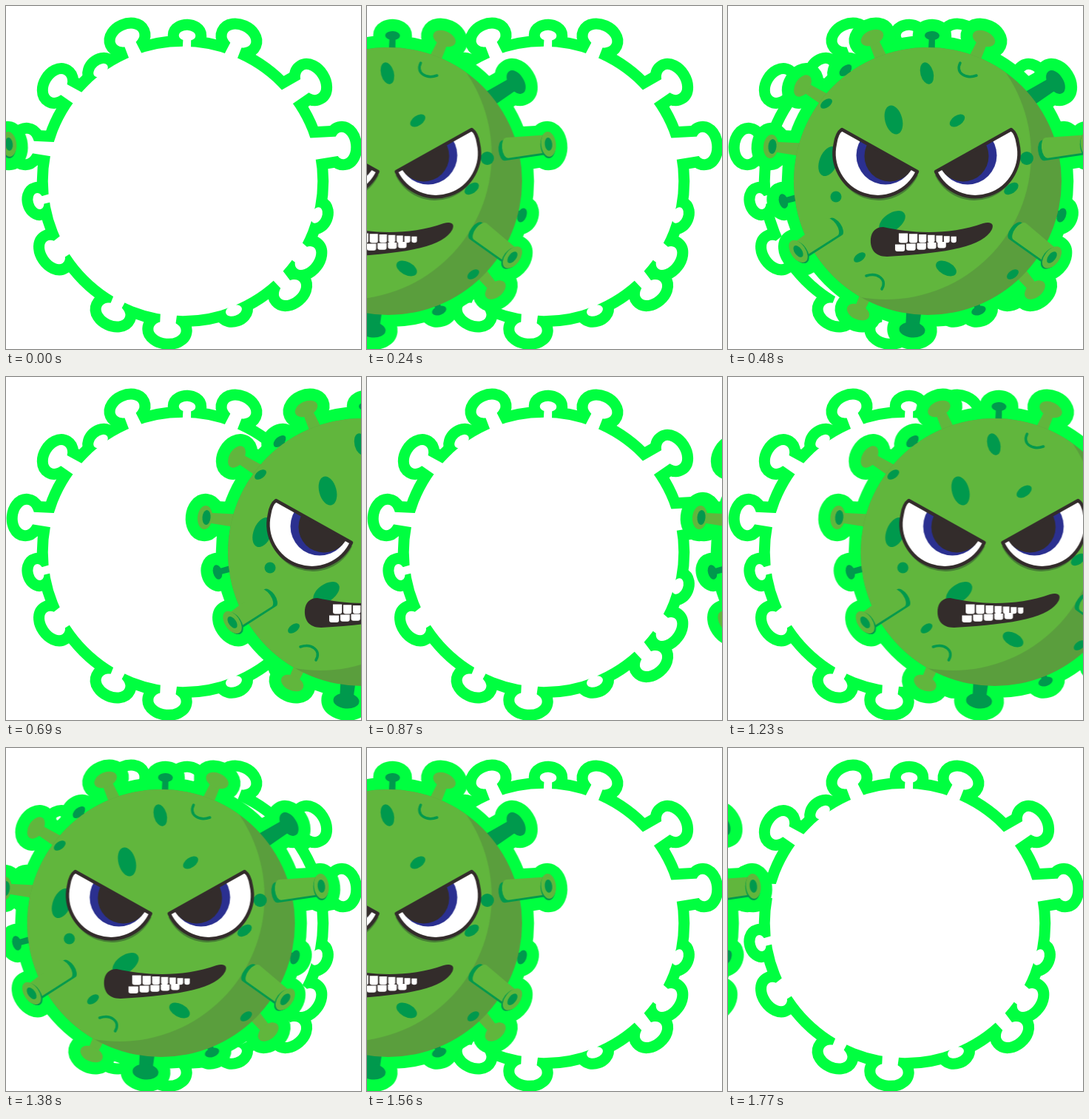
Recreate the animation shown at these times as an HTML page. Size 480 by 464 pixels, loop 1800 ms.

```html
<!DOCTYPE html>
<html lang="en">
<head>
<meta charset="utf-8">
<title>Angry virus</title>
<style>
  html, body { margin: 0; width: 100%; height: 100%; overflow: hidden; background: #fff; }
  svg { display: block; width: 100%; height: 100%; }
  .ring { fill: #00ff40; stroke: #00ff40; stroke-width: 32.5; stroke-linejoin: round; }
  .hole { fill: #fff; stroke: #fff; stroke-width: 2.5; }
  .light { fill: #61b63d; }
  .shade { fill: #5a9e3d; }
  .dark { fill: #00994d; }
  .ink { fill: #332c2b; }
  .curl { fill: none; stroke: #00994d; stroke-width: 3.5; stroke-linecap: round; }
  #virus { animation: sweep 1800ms -3ms infinite; }
  @keyframes sweep {
    0%, 100% { transform: translateX(-482.7px); animation-timing-function: steps(30, end); }
    50% { transform: translateX(422.2px); animation-timing-function: steps(30, end); }
  }
</style>
</head>
<body>
<svg viewBox="0 0 480 464">
  <defs>
    <circle id="ball" cx="270" cy="237" r="181"/>
    <clipPath id="ballClip"><use href="#ball"/></clipPath>
    <g id="shape"><use href="#ball"/></g>
    <path id="lid" d="M154 167 L256 224 A59 59 0 0 1 145 186 Q147 172 154 167Z"/>
    <clipPath id="lidClip"><use href="#lid"/></clipPath>
    <g id="eye">
      <use href="#lid" transform="translate(1 5)" fill="#477f35"/>
      <use href="#lid" fill="#fff"/>
      <g clip-path="url(#lidClip)">
        <circle cx="213" cy="202" r="39.5" fill="#2b3090"/>
        <circle cx="219" cy="203" r="34.5" class="ink"/>
      </g>
      <use href="#lid" fill="none" stroke="#332c2b" stroke-width="4.5" stroke-linejoin="round"/>
    </g>
  </defs>

  <g transform="translate(-31 0)">
    <use href="#shape" class="ring"/>
    <use href="#shape" class="hole"/>
  </g>

  <g id="virus">
    <use href="#shape" class="ring"/>
    <g id="back"></g>
    <use href="#ball" class="shade"/>
    <circle cx="214" cy="201" r="196" class="light" clip-path="url(#ballClip)"/>
    <g id="spots" class="dark">
      <circle cx="146" cy="258" r="7.5"/>
      <circle cx="404" cy="206" r="9"/>
    </g>
    <path class="curl" d="M314 77 C307 91 322 99 336 94 M187 365 C202 360 216 370 208 383"/>
    <g id="front"></g>

    <use href="#eye"/>
    <use href="#eye" transform="matrix(-1 0 0 1 537 0)"/>
    <path class="ink" d="M210 299 C250 308 300 310 345 294 C356 291 360 295 357 302 C345 325 300 334 215 339 C198 339 192 328 193 315 C194 305 200 299 210 299Z"/>
    <g id="teeth" fill="#fff"></g>
  </g>
</svg>
<script>
  const add = (id, markup) => document.getElementById(id).insertAdjacentHTML('beforeend', markup);
  const oval = (rx, ry, cls = '') => `<ellipse class="${cls}" rx="${rx}" ry="${ry}"/>`;
  const place = (x, y, turn, inner, cls = '') =>
    `<g class="${cls}" transform="translate(${x} ${y}) rotate(${turn})">${inner}</g>`;
  // local x points outward; the stem widens from the head to a rounded base
  const stem = (len, tip, base, round = 0, cls = '') =>
    `<path class="${cls}" d="M0 ${-tip} L${-len} ${-base} A${round} ${base} 0 0 0 ${-len} ${base} L0 ${tip}Z"/>`;

  const kinds = {
    stub: { depth: 6, half: 10, tip: 4, base: 5, color: 'dark', at: [[276, 40], [451, 283], [339, 412], [75, 264], [159, 87]] },
    bolt: { depth: 10.5, half: 17.5, tip: 9, base: 11, color: 'dark', at: [[443, 103], [249, 438]] },
    knob: { depth: 10, half: 16, tip: 6.5, base: 9, color: 'light', at: [[195, 43], [346, 44], [415, 384], [176, 414], [58, 190], [101, 108]] },
    arm: { depth: 10, half: 17, tip: 11.5, base: 14, at: [[486, 189], [436, 341], [97, 333]] }
  };

  // a dark arm under a lit copy pushed up and outward
  function arm({ depth, half, tip, base }, down) {
    const limb = cls => stem(60, tip, base, 7, cls);
    return limb('dark') +
      `<g transform="translate(5 ${-3 * down})">${limb('light')}</g>` +
      oval(depth, half, 'dark') +
      `<g transform="translate(1 ${-2 * down})">${oval(depth, half, 'light')}${oval(5, 9, 'dark')}</g>`;
  }

  for (const kind of Object.values(kinds)) {
    const body = stem(46, kind.tip, kind.base) + oval(kind.depth, kind.half);
    for (const [x, y] of kind.at) {
      const turn = Math.atan2(y - 212, x - 270) * 180 / Math.PI;
      add('shape', place(x, y, turn, body));
      if (kind.color) add('back', place(x, y, turn, body, kind.color));
      else add('front', place(x, y, turn, arm(kind, x > 270 ? 1 : -1)));
    }
  }
  add('back', place(60, 190, 5, oval(5.5, 10), 'dark'));

  // x, y and length of the spots sharing each tilt
  const spots = {
    '-35': [[310, 155, 11.5], [133, 132, 9], [383, 247, 11], [178, 340, 9], [222, 292, 20], [385, 363, 9]],
    '28': [[295, 355, 15]],
    '75': [[224, 154, 20], [269, 91, 15]],
    '112': [[136, 210, 21]]
  };
  for (const [tilt, group] of Object.entries(spots))
    for (const [x, y, r] of group) add('spots', place(x, y, tilt, oval(r, r * .58)));

  // each tooth is a little narrower and shorter than the one before
  function teeth(x, y, width, height, count, shrink, slope) {
    for (let i = 0; i < count; i++) {
      const w = width - 1.8, h = height;
      add('teeth', `<path d="M${x} ${y} h${w} v${h - 3} q0 3 -3 3 h${6 - w} q-3 0 -3 -3Z"/>`);
      x += width;
      y += slope * width;
      width *= shrink;
      height *= shrink;
    }
  }
  teeth(231, 307.5, 14, 13, 7, .93, .06);
  teeth(226, 322.5, 15, 9.5, 5, .97, -.06);
</script>
</body>
</html>
```
